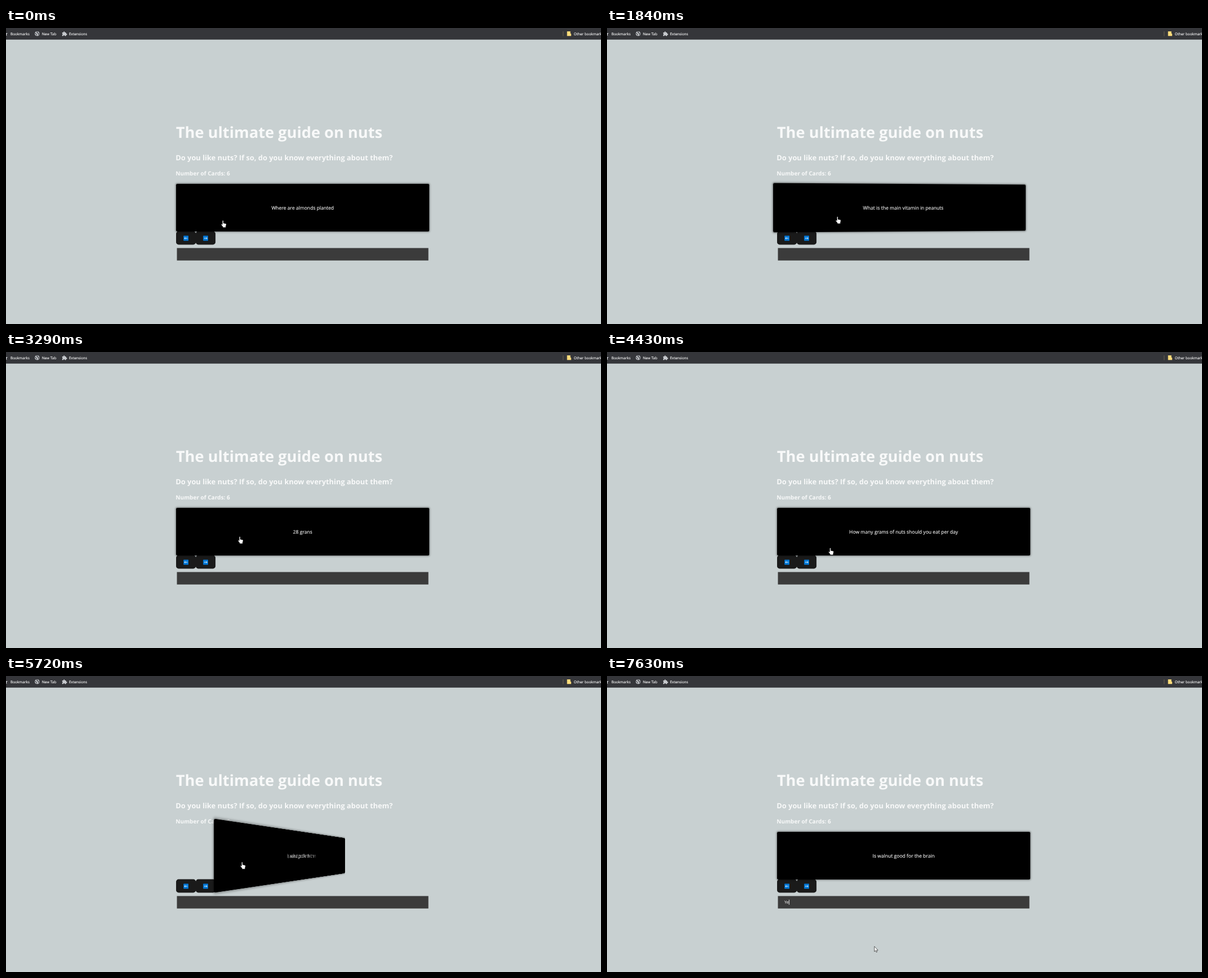
An HTML page that plays this animation: 1060x528 px, repeating every 8000 ms.

```html
<!DOCTYPE html>
<html lang="en">
<head>
<meta charset="utf-8">
<title>Flashcards</title>
<style>
  html, body { margin: 0; width: 100%; height: 100%; overflow: hidden; background: #c8d0d1; }
  body { position: relative; font-family: "Open Sans", "Noto Sans", sans-serif; }
  svg { position: absolute; left: 0; top: 0; width: 1060px; height: 528px; }
  text { fill: #fff; text-rendering: geometricPrecision; }
  .bar text { font-size: 6.45px; stroke: #fff; stroke-width: .12px; }
  .page text { font-weight: 700; fill: rgba(255, 255, 255, .87); }
  #card {
    position: absolute; left: 303px; top: 278px; width: 451px; height: 84.8px;
    border-radius: 2.3px; background: #000; transform-style: preserve-3d;
    box-shadow: 0 0 3px 1.2px rgba(0, 0, 0, .38);
  }
  .face {
    position: absolute; inset: .7px 0 0; display: flex; align-items: center; justify-content: center;
    font-size: 8.6px; color: #f4f4f4; -webkit-text-stroke: .14px #f4f4f4;
    backface-visibility: hidden; text-rendering: geometricPrecision;
  }
  #back { transform: rotateY(180deg); }
</style>
</head>
<body>
<svg viewBox="0 0 1060 528">
  <defs>
    <g id="button">
      <rect width="35.2" height="23.8" rx="4.5" fill="#1a1a1a"/>
      <rect x="13.2" y="8" width="8.8" height="8.8" rx=".4" fill="#0078d7"/>
    </g>
    <path id="arrowIcon" d="M-2.7 0H2.7M1.2-1.4 2.7 0 1.2 1.4" fill="none" stroke="#fff" stroke-width=".9"/>
  </defs>
  <g class="bar">
    <rect width="1060" height="20.7" fill="#35363a"/>
    <path d="M-1 6.5 0 9 3 9.3 1 11.2 1.6 14-1 12.6Z" fill="#c5c8cc"/>
    <circle cx="55.5" cy="10.2" r="4.1" fill="#c5c8cc"/>
    <path d="M52.2 9.2 54.2 11.3V13.4M54 7.4H56.2V9.2H58V11.4L57 12.8" fill="none" stroke="#35363a" stroke-width="1.1"/>
    <path d="M100 8H102.3A1.3 1.3 0 1 1 104.7 8H107V10.1A1.3 1.3 0 1 1 107 12.5V14.2H104.8A1.3 1.3 0 0 0 102.2 14.2H100V12.3A1.3 1.3 0 0 0 100 9.8Z" fill="#c5c8cc"/>
    <path d="M992.5 6V14.5" stroke="#6b6250" stroke-width=".9"/>
    <path d="M999.5 6H1005.5V9.5L1006.8 10.5V14.3H999.5Z" fill="#fddc7b"/>
    <text x="8" y="12.5">Bookmarks</text>
    <text x="64" y="12.5">New Tab</text>
    <text x="112.2" y="12.5">Extensions</text>
    <text x="1011.5" y="12.5">Other bookmarks</text>
  </g>
  <g class="page">
    <text x="302.7" y="196.2" font-size="27.35">The ultimate guide on nuts</text>
    <text x="302.2" y="235.7" font-size="12.9">Do you like nuts? If so, do you know everything about them?</text>
    <text x="302.3" y="263.4" font-size="10.1">Number of Cards: 6</text>
  </g>
  <use href="#button" x="303" y="362.6"/>
  <use href="#button" x="338" y="362.6"/>
  <use href="#arrowIcon" transform="translate(320.6 375) scale(-1 1)"/>
  <use href="#arrowIcon" transform="translate(355.6 375)"/>
  <rect id="hover" x="338.4" y="363" width="34.5" height="23" rx="4.2" fill="none" stroke="#646cff" stroke-width=".6"/>
  <rect x="304.5" y="392.5" width="448" height="22.2" fill="#3b3b3b"/>
  <text id="typed" x="316" y="406.3" font-size="7.4"></text>
  <rect id="caret" y="399" width=".8" height="9" fill="#fff"/>
</svg>
<div id="card">
  <div class="face" id="front"></div>
  <div class="face" id="back"></div>
</div>
<svg viewBox="0 0 1060 528">
  <g id="cursor" stroke-linejoin="round">
    <path id="hand" d="M-1.1 1A1 1 0 0 1 .9 1V4.7L5 5.6Q6.2 6 6 7.5L5.2 10.2V12.6H-.4V11.2L-3.1 7.8Q-3.5 6.2-2.2 6.3L-1.1 7.3Z" fill="#fff" stroke="#000" stroke-width=".7"/>
    <path id="arrow" d="M.3.3V9.6L2.4 7.7 3.8 10.8 5.3 10.1 4 7.1H6.8Z" fill="#fff" stroke="#222" stroke-width=".7"/>
    <path id="beam" d="M-1.8.3H1.8M0 .3V11.7M-1.8 11.7H1.8" fill="none" stroke="#c5c5c5" stroke-width=".8"/>
  </g>
</svg>
<script>
const LOOP = 8000;
const CAPTURE = 400 / 3;      // pointer and card are seen at 7.5 pictures a second
const CAPTURE_LEAD = 47;
const FLIP = 150;
const BLINK = 500;

const cards = [
  ["Where are almonds planted", "Asia"],
  ["What is the main vitamin in peanuts", "Vitamin E"],
  ["How many grams of nuts should you eat per day", "28 grans"],
  ["Is walnut good for the brain", "Yes"]
];
const nextClicks = [670, 2510, 4970];
const cardClicks = [1245, 1752, 3154, 3752, 5142, 5682];
const inputClick = 6240;
const answer = "Ye";
const keyPresses = [7360, 7630];

// Places where the pointer rests or turns
const stops = [
  { x: 386.5, y: 343.3, arrive: 0, leave: 0 },
  { x: 350, y: 380, arrive: 267, leave: 930 },
  { x: 410.7, y: 336.5, arrive: 1333, leave: 1867 },
  { x: 357, y: 372, arrive: 2133, leave: 2800 },
  { x: 411.7, y: 323.7, arrive: 3066, leave: 3066 },
  { x: 416.5, y: 329.3, arrive: 3333, leave: 3333 },
  { x: 431, y: 326, arrive: 3600, leave: 3600 },
  { x: 412.5, y: 338.8, arrive: 4267, leave: 4267 },
  { x: 356, y: 380, arrive: 4667, leave: 4933 },
  { x: 420.8, y: 331.8, arrive: 5200, leave: 5733 },
  { x: 445.5, y: 387.5, arrive: 6000, leave: 6000 },
  { x: 476, y: 482, arrive: 6600, leave: LOOP }
];

const $ = id => document.getElementById(id);
const show = (id, on) => $(id).setAttribute("visibility", on ? "visible" : "hidden");
const clamp = v => Math.min(1, Math.max(0, v));
const smooth = v => v * v * (3 - 2 * v);
const easeOut = v => 1 - (1 - v) ** 2.5;
const countPast = (times, t) => times.filter(time => time <= t).length;

function pointerAt(t) {
  const i = stops.findLastIndex(stop => stop.arrive <= t);
  const from = stops[i], to = stops[i + 1] || from;
  const k = smooth(clamp((t - from.leave) / (to.arrive - from.leave || 1)));
  return [from.x + (to.x - from.x) * k, from.y + (to.y - from.y) * k];
}

// Clicks turn the card over and back in turn
function angleAt(t) {
  return cardClicks.reduce((angle, click, i) =>
    angle + (i % 2 ? -180 : 180) * easeOut(clamp((t - click) / FLIP)), 0);
}

function drawPointer(t) {
  const [x, y] = pointerAt(t);
  const inside = (left, top, right, bottom) => x >= left && x < right && y >= top && y < bottom;
  const onNext = inside(338, 362.8, 373.5, 386.4);
  const onHand = onNext || inside(303, 278, 754, 362.8);
  const onInput = inside(304.5, 392.5, 752.5, 414.7);
  $("cursor").setAttribute("transform", `translate(${x} ${y})`);
  show("hand", onHand);
  show("beam", onInput);
  show("arrow", !onHand && !onInput);
  show("hover", onNext);
}

function drawInput(t) {
  const typed = $("typed");
  typed.textContent = answer.slice(0, countPast(keyPresses, t));
  const lastAction = [inputClick, ...keyPresses].findLast(time => time <= t);
  show("caret", (t - lastAction) % (2 * BLINK) < BLINK);
  $("caret").setAttribute("x", 316 + typed.getComputedTextLength());
}

function render(t) {
  const seen = Math.floor((t + CAPTURE_LEAD) / CAPTURE) * CAPTURE;
  [$("front").textContent, $("back").textContent] = cards[countPast(nextClicks, t)];
  $("card").style.transform = `perspective(565px) rotateY(${angleAt(seen)}deg)`;
  drawPointer(seen);
  drawInput(t);
}

function tick() {
  render(performance.now() % LOOP);
  requestAnimationFrame(tick);
}
tick();
</script>
</body>
</html>
```
